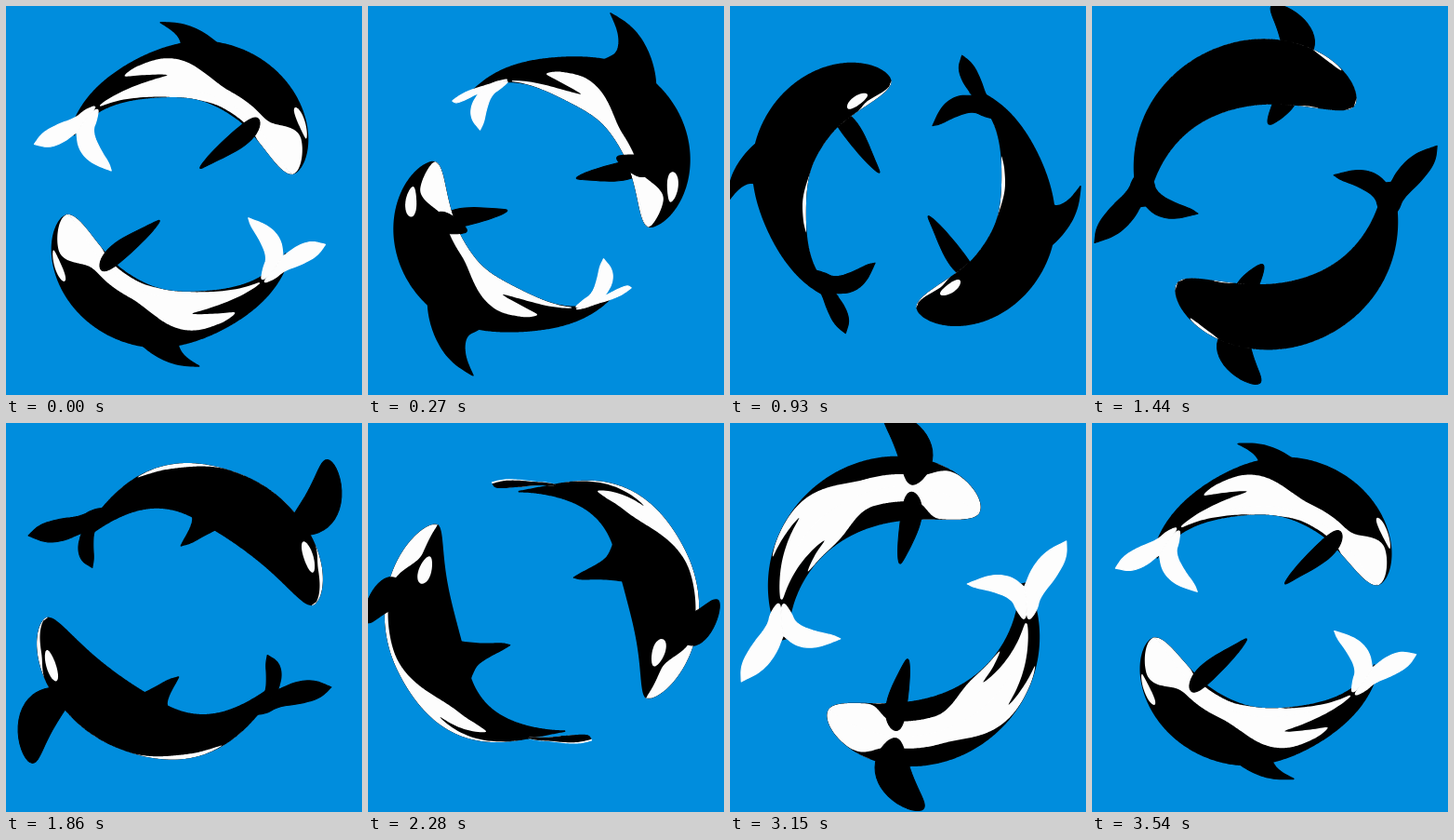
Write an HTML page with a canvas that moves like this. It is 383 by 418 pixels and loops after 3570 ms.

```html
<!DOCTYPE html>
<html lang="en">
<head>
<meta charset="utf-8">
<title>Circling orcas</title>
<style>
  html, body { margin: 0; width: 100%; height: 100%; overflow: hidden; background: #008ddd; }
  canvas { display: block; width: 383px; height: 418px; }
</style>
</head>
<body>
<canvas id="stage"></canvas>
<script>
const W = 383, H = 418, CX = 187, CY = 202.4;
const LOOP = 3570, STEP = 30, RADIUS = 132, RAD = Math.PI / 180, TAU = 2 * Math.PI;
const BLUE = '#008ddd', BLACK = '#000', WHITE = '#fdfdfd';

const canvas = document.getElementById('stage');
const ctx = canvas.getContext('2d');
const dpr = window.devicePixelRatio || 1;
canvas.width = W * dpr;
canvas.height = H * dpr;

const range = (n, f) => Array.from({ length: n }, (_, i) => f(i));
const clamp = (v, lo, hi) => Math.min(hi, Math.max(lo, v));
const ease = (lo, hi, v) => {
  const t = clamp((v - lo) / (hi - lo), 0, 1);
  return t * t * (3 - 2 * t);
};

// Corner cutting, then splitting of long edges; doubled points stay sharp
function refine(pts) {
  const next = (list, i) => list[(i + 1) % list.length];
  const mix = (p, q, t) => [p[0] + (q[0] - p[0]) * t, p[1] + (q[1] - p[1]) * t];
  for (let k = 0; k < 3; k++)
    pts = pts.flatMap((p, i) => [mix(p, next(pts, i), .25), mix(p, next(pts, i), .75)]);
  return pts.flatMap((p, i) => {
    const q = next(pts, i), n = Math.max(1, Math.ceil(Math.abs(q[0] - p[0]) / 2));
    return range(n, j => mix(p, q, j / n));
  });
}

// Skin markings: [degrees behind the nose, degrees around from the back]
const bellyEdge = a => 99 + 56 * ease(14, 31, a) * (1 - ease(54, 92, a));
const BELLY = refine([
  ...range(26, i => [i * 4, bellyEdge(i * 4)]),
  [105, 108], [105, 117], [96, 132], [86, 140], [86, 143], [95, 148], [108, 157],
  [122, 172], [122, 182], [122, 182], [0, 182], [0, 182]
]);
const EYE = range(40, i => {
  const t = i / 40 * TAU;
  return [20.4 + 6.6 * Math.cos(t), 83 + 5 * Math.cos(t) + 14 * Math.sin(t)];
});

// Fins: [degrees behind the nose, reach]
const DORSAL = refine([
  [56, 25], [62, 44], [70, 63], [78, 77], [86.4, 82], [86.4, 82], [81, 62], [79, 44], [81, 34], [88, 10]
]);
const FLUKE = refine([
  [122, 0], [128, 11], [134, 15], [141, 37], [146, 52], [151, 58], [151, 58],
  [150.5, 32], [146, 12], [139, 0], [139, 0]
]);
const FLIPPER = range(48, i => {
  const t = i / 48 * TAU, k = .35 - .65 * Math.cos(t);
  return [33 + 9 * k * k + 6.5 * Math.sin(t), 63 * k];
});

// Half height, half width and centre line of the body
function profile(a) {
  const x = a / 150;
  return {
    high: 97 * x ** .6 * (1 - x * x) ** 2.2,
    wide: 101.5 * x ** .55 * (1 - x) ** 1.1,
    mid: a < 62 ? 2 - 15 * (1 - a / 62) ** 2 : 3.5 * Math.cos(TAU * (a - 62) / 70) - 1.5
  };
}

// Cross-section as seen after rolling; the flanks taper towards the belly
function section(a, roll) {
  const { high, wide, mid } = profile(a);
  const c = Math.cos(roll), x = high * c, y = wide * Math.sin(roll);
  const size = Math.hypot(x, y), diff = Math.atan2(y, x) - roll;
  const taper = 1 - .15 * Math.min(1, a / 40) * Math.sin(2 * roll) ** 2;
  return {
    shift: roll + diff - TAU * Math.round(diff / TAU),
    at: u => {
      const v = Math.cos(u);
      return mid * c + size * v * (v * c < 0 ? taper : 1);
    }
  };
}

const place = (a, n) => [(RADIUS + n) * Math.cos(a * RAD), -(RADIUS + n) * Math.sin(a * RAD)];

function trace(pts) {
  ctx.beginPath();
  pts.forEach(p => ctx.lineTo(p[0], p[1]));
  ctx.closePath();
}

function shape(pts, color, line) {
  trace(pts);
  ctx.fillStyle = ctx.strokeStyle = color;
  ctx.fill();
  if (line) {
    ctx.lineWidth = line;
    ctx.stroke();
  }
}

function bodyOutline(roll) {
  const edge = u => range(283, i => place(i / 2, section(i / 2, roll).at(u)));
  return edge(0).concat(edge(Math.PI).reverse());
}

// Hidden parts of a marking collapse onto the edge of the body
function marking(pts, centre, side, roll) {
  const turn = TAU * Math.round((side * centre * RAD + roll - Math.PI / 2) / TAU);
  shape(pts.map(([a, phi]) => {
    const s = section(a, roll);
    return place(a, s.at(clamp(side * phi * RAD + s.shift - turn, 0, Math.PI)));
  }), WHITE);
}

function whale(roll, droop) {
  const c = Math.cos(roll), s = Math.sin(roll);
  const down = Math.sin(droop), out = Math.cos(droop);
  const solid = (a, d, l) => place(a, d * c - l * s);
  const sides = c > 0 ? [-1, 1] : [1, -1];
  const dorsal = () => shape(DORSAL.map(([a, d]) => solid(a, d, 0)), BLACK, 1.5);
  const flippers = front => sides.forEach(side => {
    const depth = -(26 + 63 * down) * s + (22 + 63 * out) * side * c;
    if (depth > 0 !== front) return;
    shape(FLIPPER.map(([a, k]) => solid(a, -26 - k * down, side * (22 + k * out))), BLACK, 1);
  });

  flippers(false);
  if (s < 0) dorsal();

  const body = bodyOutline(roll);
  shape(body, BLACK);
  ctx.save();
  trace(body);
  ctx.clip();
  for (const side of sides) {
    marking(BELLY, 145, side, roll);
    marking(EYE, 83, side, roll);
  }
  ctx.restore();

  if (s >= 0) dorsal();
  sides.forEach(side => {
    const color = s + .2 * side * c > 0 ? BLACK : WHITE;
    shape(FLUKE.map(([a, l]) => solid(a, -4 - .2 * l, side * l)), color, 1.2);
  });
  flippers(true);
}

function draw(now) {
  const turn = Math.floor(now % LOOP / STEP) * STEP / LOOP * TAU;
  const lift = Math.max(0, Math.cos(turn - 282 * RAD)) ** 2;
  ctx.setTransform(dpr, 0, 0, dpr, 0, 0);
  ctx.fillStyle = BLUE;
  ctx.fillRect(0, 0, W, H);
  ctx.lineJoin = 'round';
  for (const half of [0, Math.PI]) {
    ctx.save();
    ctx.translate(CX, CY);
    ctx.rotate(turn - 10 * RAD + half);
    whale(turn - 49 * RAD, (47 - 43 * lift) * RAD);
    ctx.restore();
  }
  requestAnimationFrame(draw);
}
requestAnimationFrame(draw);
</script>
</body>
</html>
```
